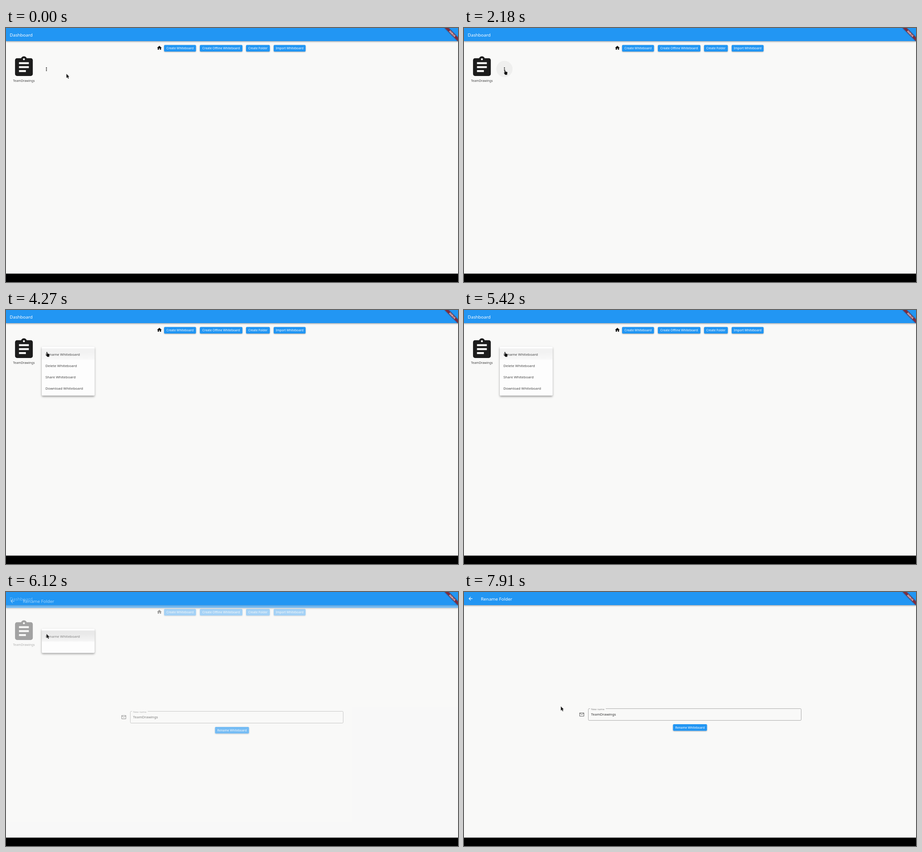
Write an HTML page that moves like this. It is 998 px wide and 561 px high and loops after 8 s.

```html
<!DOCTYPE html>
<html lang="en">
<head>
<meta charset="utf-8">
<title>Whiteboard dashboard</title>
<style>
  html, body { margin: 0; width: 100%; height: 100%; overflow: hidden; background: #000; }
  svg { display: block; width: 100%; height: 100%; }
  text { font-family: "Noto Sans", "Open Sans", sans-serif; }
  .title { font-size: 9.75px; font-weight: 500; fill: #fff; }
  .btn text { font-size: 6.75px; font-weight: 500; fill: #fff; text-anchor: middle; }
  .btn rect, .bar { fill: #2196f3; }
  .sheet { fill: #f9f9f8; }
  .item { font-size: 7.9px; fill: #484848; }
</style>
</head>
<body>
<svg viewBox="0 0 998 561">
  <defs>
    <filter id="low" x="-10%" y="-30%" width="120%" height="180%">
      <feDropShadow dx="0" dy="1" stdDeviation=".8" flood-opacity=".35"/>
    </filter>
    <filter id="barShadow" x="-1%" y="-10%" width="102%" height="150%">
      <feDropShadow dx="0" dy="1.4" stdDeviation="1.5" flood-opacity=".35"/>
    </filter>
    <filter id="high" x="-20%" y="-20%" width="140%" height="150%">
      <feDropShadow dx="0" dy="2.4" stdDeviation="2" flood-opacity=".38"/>
    </filter>
    <filter id="blur" x="-20%" y="-60%" width="140%" height="220%">
      <feGaussianBlur stdDeviation="1.3"/>
    </filter>
    <linearGradient id="press" x2="0" y2="1">
      <stop offset=".3"/>
      <stop offset="1" stop-opacity=".4"/>
    </linearGradient>
  </defs>

  <g id="home">
    <rect class="sheet" width="998" height="543"/>
    <rect class="bar" width="998" height="29" filter="url(#barShadow)"/>
    <text class="title" x="8.3" y="18.5">Dashboard</text>
    <path transform="translate(332.4 37.7) scale(.52)" fill="#111" d="M10 20v-6h4v6h5v-8h3L12 3 2 12h3v8z"/>
    <g id="buttons"></g>
    <path transform="translate(13.4 60.2) scale(2.18)" fill="#1c1c1c" d="M19 3h-4.18C14.4 1.84 13.3 1 12 1c-1.3 0-2.4.84-2.82 2H5c-1.1 0-2 .9-2 2v14c0 1.1.9 2 2 2h14c1.1 0 2-.9 2-2V5c0-1.1-.9-2-2-2zm-7 0c.55 0 1 .45 1 1s-.45 1-1 1-1-.45-1-1 .45-1 1-1zm2 14H7v-2h7v2zm3-4H7v-2h10v2zm0-4H7V7h10v2z"/>
    <text x="39.5" y="119.4" font-size="6.9" fill="#444" text-anchor="middle">TeamDrawings</text>
    <circle id="halo" cx="89.3" cy="90.5" r="18"/>
    <path d="M89.3 87.9v0m0 3.1v0m0 3.1v0" stroke="#1c1c1c" stroke-width="2.2" stroke-linecap="round"/>
  </g>

  <g id="page">
    <rect class="sheet" width="998" height="543"/>
    <rect class="bar" width="998" height="29" filter="url(#barShadow)"/>
    <path transform="translate(8.2 8.4) scale(.52)" fill="#fff" d="M20 11H7.83l5.59-5.59L12 4l-8 8 8 8 1.41-1.41L7.83 13H20v-2z"/>
    <text class="title" x="37.3" y="18.5">Rename Folder</text>
    <path transform="translate(253.8 264.3) scale(.52)" fill="#606060" d="M20 4H4c-1.1 0-2 .9-2 2v12c0 1.1.9 2 2 2h16c1.1 0 2-.9 2-2V6c0-1.1-.9-2-2-2zm0 14H4V8l8 5 8-5v10zm-8-7L4 6h16l-8 5z"/>
    <path d="M278.5 257.6h-2q-2 0-2 2v22q0 2 2 2h466q2 0 2-2v-22q0-2-2-2H313" fill="none" stroke="#969696" stroke-width=".8"/>
    <text x="280.8" y="261" font-size="5.8" fill="#888">New name</text>
    <text x="280.5" y="273.2" font-size="7.9" fill="#333">TeamDrawings</text>
    <g id="submit"></g>
  </g>

  <g id="menu">
    <rect id="sheet" x="79" y="81" rx="2" fill="#fdfdfd" filter="url(#high)"/>
    <rect id="row" x="79" y="85" width="116.5" height="24.5" fill="url(#press)"/>
    <g id="items"></g>
  </g>

  <rect y="542.5" width="998" height="19"/>
  <g transform="translate(998 0) rotate(45)">
    <rect x="-22" y="14.6" width="44" height="6.2" opacity=".5" filter="url(#blur)"/>
    <rect x="-22" y="14.6" width="44" height="6.2" fill="#b71c1c" fill-opacity=".63"/>
    <text y="19.6" font-size="5.1" font-weight="800" fill="#fff" text-anchor="middle">DEBUG</text>
  </g>
  <g id="cursor">
    <path id="arrow" d="M0 0V9.6L2.2 7.8 3.8 11 5.5 10.2 4 7.1 6.6 6.8Z" fill="#111" stroke="#ddd" stroke-width=".4"/>
    <path id="hand" d="M0 .6Q1-.8 2 .6L2.4 3.6 6 4.4Q7 4.7 6.9 6L6.3 9.2V11H1.8L-.6 7.4Q-1.5 5.7-.2 5.6L.7 6.3Z" fill="#111" stroke="#ddd" stroke-width=".3"/>
  </g>
</svg>
<script>
const $ = id => document.getElementById(id);
const set = (el, attrs) => { for (const k in attrs) el.setAttribute(k, attrs[k]); };
const clamp = v => Math.min(1, Math.max(0, v));

// Linear interpolation through [time, value] points.
function track(points, t) {
  const i = points.findIndex(p => p[0] > t);
  if (i < 0) return points[points.length - 1][1];
  if (i === 0) return points[0][1];
  const [t0, a] = points[i - 1], [t1, b] = points[i];
  return a + (b - a) * (t - t0) / (t1 - t0);
}

function bezier(x, x1, y1, x2, y2) {
  const at = (s, a, b) => 3 * s * (1 - s) ** 2 * a + 3 * s * s * (1 - s) * b + s ** 3;
  let lo = 0, hi = 1;
  for (let i = 0; i < 24; i++) {
    const mid = (lo + hi) / 2;
    if (at(mid, x1, x2) < x) lo = mid; else hi = mid;
  }
  return at(lo, y1, y2);
}

const button = (label, x, w, y) => `<g class="btn">
  <rect x="${x}" y="${y}" width="${w}" height="14.5" rx="2" filter="url(#low)"/>
  <text x="${x + w / 2}" y="${y + 9.7}">${label}</text></g>`;

$('buttons').innerHTML =
  button('Create Whiteboard', 349, 70.5, 37.6) +
  button('Create Offline Whiteboard', 428, 94, 37.6) +
  button('Create Folder', 530, 52.5, 37.6) +
  button('Import Whiteboard', 591, 70.5, 37.6);
$('submit').innerHTML = button('Rename Whiteboard', 461.5, 75, 292);
$('items').innerHTML = ['Rename', 'Delete', 'Share', 'Download'].map((verb, i) =>
  `<text class="item" x="87" y="${100.7 + 25 * i}">${verb} Whiteboard</text>`).join('');
const items = [...$('items').children];

const cursorX = [[1180, 133.3], [1440, 96.5], [1600, 89], [7440, 89.5], [7770, 199], [7870, 199], [7900, 213.8]];
const cursorY = [[1180, 101], [1440, 93], [1600, 92.5], [7440, 92.5], [7770, 232], [7870, 232], [7900, 252.5]];
const haloAlpha = [[1430, 0], [1560, .04], [2980, .04], [3120, .095], [3260, .095], [3500, 0]];
const menuOpen = [[3255, 0], [3310, .183], [3410, .183], [3655, 1], [5980, 1], [6200, 0]];
const pagePush = [[5660, 0], [5740, .279], [5980, .279], [6200, 1]];
const rowAlpha = [[5520, .045], [5680, .12]];

function drawMenu(open) {
  const unit = 1 / 5.5;
  set($('menu'), { opacity: clamp(open * 3) });
  set($('sheet'), { width: 116.5 * clamp(open / unit), height: 108 * clamp(open / unit / 4) });
  items.forEach((el, i) => set(el, { opacity: clamp((open - (i + 1) * unit) / (1.5 * unit)) }));
}

function draw(t) {
  const push = track(pagePush, t);
  const open = track(menuOpen, t);
  drawMenu(open);
  set($('row'), { opacity: track(rowAlpha, t) * clamp((open - .18) / .27) });
  set($('halo'), { opacity: track(haloAlpha, t) });

  const rise = 135 * (1 - bezier(push, .4, 0, .2, 1));
  set($('page'), { opacity: bezier(push, .42, 0, 1, 1), transform: `translate(0 ${rise})`,
    visibility: push > 0 ? 'visible' : 'hidden' });

  const pointing = t >= 1400 && t < 5720;
  set($('cursor'), { transform: `translate(${track(cursorX, t)} ${track(cursorY, t)})` });
  set($('hand'), { visibility: pointing ? 'visible' : 'hidden' });
  set($('arrow'), { visibility: pointing ? 'hidden' : 'visible' });
}

const start = performance.now();
function tick() {
  draw((performance.now() - start) % 8000);
  requestAnimationFrame(tick);
}
tick();
</script>
</body>
</html>
```
